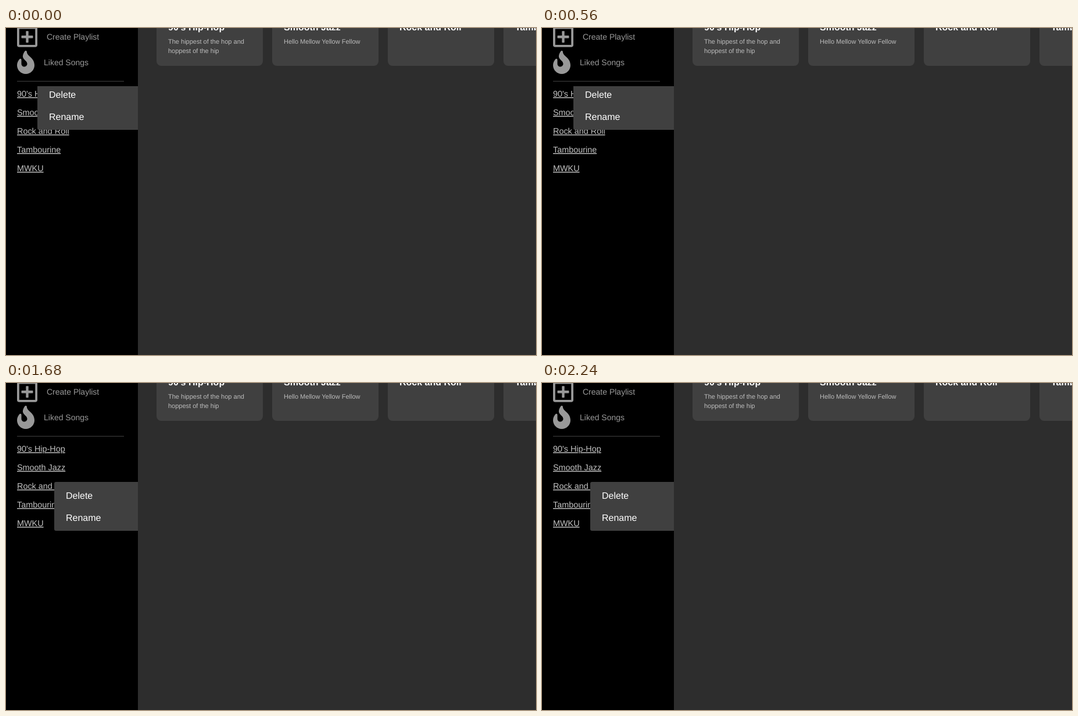
Animation of 912 by 562 pixels, one loop 4340 ms. Source, as an HTML page:

```html
<!DOCTYPE html>
<html lang="en">
<head>
<meta charset="utf-8">
<title>Playlist menu</title>
<style>
  html, body { margin: 0; width: 100%; height: 100%; overflow: hidden; background: #2d2d2d; }
  svg { display: block; width: 912px; height: 562px; }
  text { font-family: "Liberation Sans", Arial, Helvetica, sans-serif; text-rendering: geometricPrecision; }
  .nav { font-size: 14px; fill: #999; }
  .link { font-size: 14.4px; fill: #c2c2c2; text-decoration: underline; }
  .title { font-size: 16px; font-weight: 700; fill: #fff; }
  .desc { font-size: 11px; fill: #bcbcbc; }
  .item { font-size: 16px; fill: #fff; }
</style>
</head>
<body>
<svg viewBox="0 0 912 562">
  <defs>
    <clipPath id="list"><rect x="0" y="100" width="227" height="462"/></clipPath>
  </defs>
  <rect width="912" height="562" fill="#2d2d2d"/>
  <g id="cards"></g>

  <rect width="227" height="562" fill="#000"/>
  <g fill="#999">
    <rect x="20.9" y="-0.4" width="31.2" height="31.3" rx="1.9" fill="none" stroke="#999" stroke-width="3.8"/>
    <rect x="26.5" y="13.05" width="20" height="4.4" rx="0.9"/>
    <rect x="34.3" y="5.25" width="4.4" height="20" rx="0.9"/>
    <path transform="translate(19 39) scale(.078125)" d="M216 23.9c0-23.8-30.7-32.8-44.2-13.1C48 191.9 224 200 224 288c0 35.6-29.1 64.5-64.9 64-35.1-.5-63.1-29.8-63.1-65v-85.5c0-21.7-26.5-32.2-41.4-16.5C27.8 213.2 0 261.3 0 320c0 105.9 86.1 192 192 192s192-86.1 192-192c0-170.3-168-193-168-296.1z"/>
  </g>
  <text class="nav" x="70" y="20">Create Playlist</text>
  <text class="nav" x="65" y="64">Liked Songs</text>
  <rect x="19" y="91" width="184" height="1" fill="#404040"/>
  <g id="links"></g>

  <g clip-path="url(#list)">
    <g id="menu">
      <rect width="200" height="84" rx="3" fill="#404040"/>
      <rect id="hover" y="5" width="200" height="38" fill="#4a4a4a"/>
      <text class="item" x="20" y="29">Delete</text>
      <text class="item" x="20" y="67">Rename</text>
    </g>
  </g>
</svg>
<script>
  const LOOP = 4340;
  const $ = id => document.getElementById(id);

  function add(parent, tag, attrs, text = '') {
    const el = document.createElementNS('http://www.w3.org/2000/svg', tag);
    for (const key in attrs) el.setAttribute(key, attrs[key]);
    el.textContent = text;
    parent.append(el);
  }

  const playlists = [
    ["90's Hip-Hop", 'The hippest of the hop and', 'hoppest of the hip'],
    ['Smooth Jazz', 'Hello Mellow Yellow Fellow'],
    ['Rock and Roll'],
    ['Tambourine'],
    ['MWKU']
  ];

  playlists.forEach(([name, ...lines], i) => {
    add($('links'), 'text', { class: 'link', x: 19, y: 118 + 32 * i }, name);
    const x = 259 + 199 * i;
    if (x > 912) return;
    add($('cards'), 'rect', { x, y: -200, width: 183, height: 265, rx: 8, fill: '#404040' });
    add($('cards'), 'text', { class: 'title', x: x + 20, y: 4 }, name);
    lines.forEach((line, n) =>
      add($('cards'), 'text', { class: 'desc', x: x + 20, y: 27 + 16 * n }, line));
  });

  // Each step holds its value until the next one begins.
  function play(id, prop, steps) {
    const frames = steps.map(([ms, value]) => ({ offset: ms / LOOP, [prop]: value, easing: 'step-end' }));
    frames.push({ offset: 1, [prop]: steps[steps.length - 1][1] });
    $(id).animate(frames, { duration: LOOP, iterations: Infinity }).startTime = 0;
  }

  play('menu', 'transform', [[0, 'translate(54px, 91px)'], [1680, 'translate(83px, 170px)']]);
  play('hover', 'opacity', [[0, 0], [210, 1], [560, 0], [1820, 1], [2170, 0]]);
</script>
</body>
</html>
```
